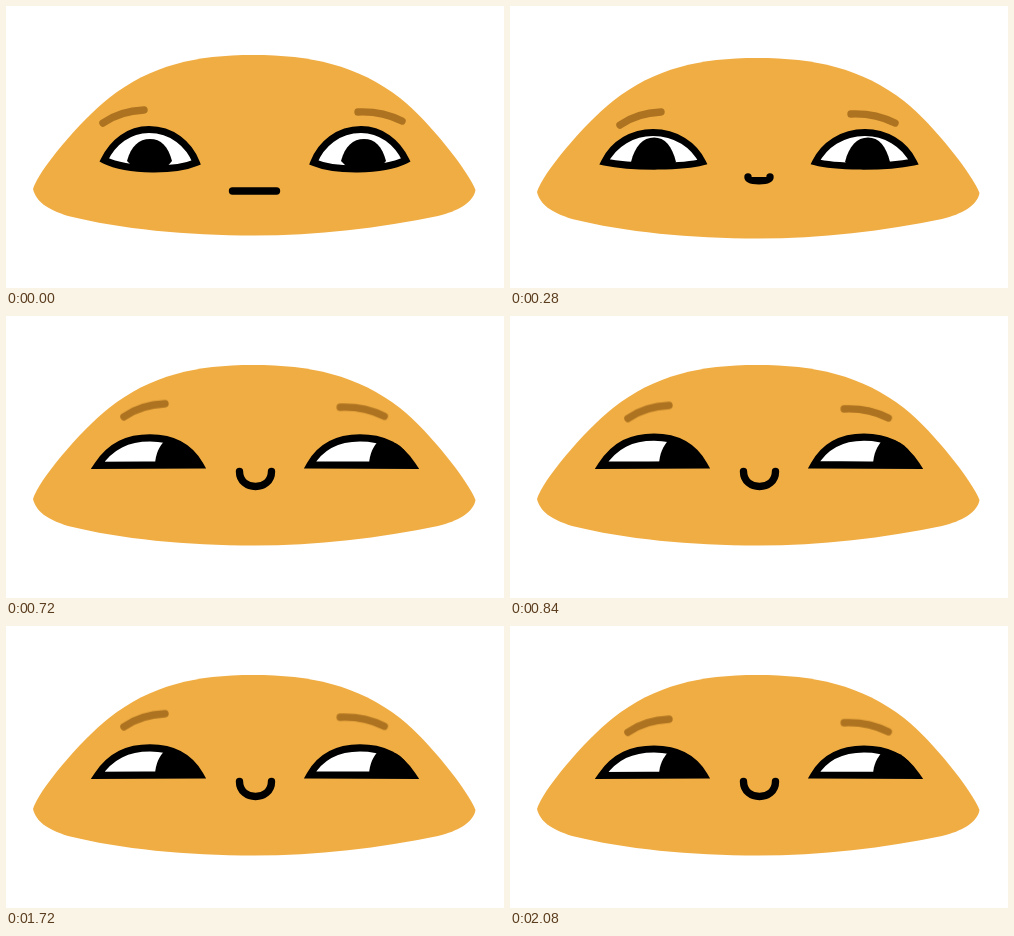
These frames come from a looping animation (498 px wide and 282 px high, 3 s). An HTML page without scripts:

```html
<!DOCTYPE html>
<html lang="en">
<head>
<meta charset="utf-8">
<title>Smirking face</title>
<style>
  html, body { margin: 0; width: 100%; height: 100%; overflow: hidden; background: #fff; }
  svg { display: block; width: 498px; height: 282px; animation: waggle 3s step-end infinite; }

  .body { fill: #f0ad43; }
  .eye { fill: #fff; stroke: #000; stroke-width: 7; }
  .brow, .mouth { fill: none; stroke-width: 7.4; stroke-linecap: round; }
  .brow { stroke: #ad7321; }
  .mouth { stroke: #000; }

  .face { animation: bob 3s infinite; }
  .eye { animation: eye 3s infinite; }
  .pupil { animation: pupil 3s infinite; }
  .mouth { animation: mouth 3s infinite; }
  .brow { animation: brow 3s infinite; }

  .brows { transform: translateY(var(--brow)); }
  .eyes { transform: scaleY(var(--lid)); transform-origin: 0 152px; }
  .left { --mid: 13px, -1px; --end: 21px, -10.8px; }
  .right { --mid: -11px, -1px; --end: -17.8px, -9.3px; }

  /* Pose changes run in 40 ms ticks: three to the half-way pose, four to the smirk. */
  @keyframes bob {
    0%, 5.333% { transform: translateY(0); animation-timing-function: steps(4); }
    10.666% { transform: translateY(4px); animation-timing-function: steps(3); }
    14.666%, 100% { transform: translateY(0); }
  }
  @keyframes eye {
    0%, 5.333% {
      d: path("M98.2 154C107 136 123 123.5 143 123.5C166 123.5 183 138 190.3 156.5C170 165 123 166 98.2 154Z");
      animation-timing-function: steps(3);
    }
    9.333% {
      d: path("M94.5 153C104 134 123 123.5 143 123.5C166 123.5 184 136 192.4 153C175 158 123 159 94.5 153Z");
      animation-timing-function: steps(4);
    }
    14.666%, 100% {
      d: path("M91.5 149.4C105 130 122 123 144 123C168 123 184 132 194 149C170 149.2 120 149.4 91.5 149.4Z");
    }
  }
  @keyframes pupil {
    0%, 5.333% {
      d: path("M121 155C125 140 133 133 144 133C155 133 162 140 166 155L160 162L128 162Z");
      animation-timing-function: steps(3);
    }
    9.333% {
      d: path("M121 153C125 137 133 128.5 144 128.5C155 128.5 162 137 166 153L162 157L126 157Z");
      animation-timing-function: steps(4);
    }
    14.666%, 100% {
      d: path("M149 149C149.5 138 153 132 159 125C175 124 186 132 192 148L190 149L149 149Z");
    }
  }
  @keyframes mouth {
    0%, 5.333% {
      d: path("M226.5 185C240 185 257 185 270.5 185");
      animation-timing-function: steps(3);
    }
    9.333% {
      d: path("M238 168C238 173 260 173 260 168");
      animation-timing-function: steps(4);
    }
    14.666%, 100% { d: path("M233.5 155.5C233.5 175.5 265.5 175.5 265.5 155.5"); }
  }
  @keyframes brow {
    0%, 5.333% { transform: translate(0px, 0px); animation-timing-function: steps(3); }
    9.333% { transform: translate(var(--mid)); animation-timing-function: steps(4); }
    14.666%, 100% { transform: translate(var(--end)); }
  }

  /* Two quick raises, played twice per loop; the lids trail the brows. */
  @keyframes waggle {
    0%, 29.333%, 36%, 62.666%, 69.333%, 100% { --brow: 0px; --lid: 1; }
    24%, 30.666%, 57.333%, 64% { --brow: -5.5px; --lid: 1.035; }
    25.333%, 32%, 58.666%, 65.333% { --brow: -10px; --lid: 1.08; }
    26.666%, 33.333%, 60%, 66.666% { --brow: -8px; --lid: 1.09; }
    28%, 34.666%, 61.333%, 68% { --brow: -3.8px; --lid: 1.065; }
  }
</style>
</head>
<body>
<svg viewBox="0 0 498 282">
  <g class="face">
    <path class="body" d="M27 183C32 165 73 116 103 92C145 59 190 49 247 49C305 49 351 59 394 92C424 116 462 165 469.5 184C467 197 452 205 432 210C375 222 310 229.5 248 229.5C180 229.5 115 223 62 210C40 203 30 195 27 183Z"/>
    <g class="brows">
      <path class="brow left" d="M97 117Q114 105 138 104"/>
      <path class="brow right" d="M352 106Q376 105 396 115"/>
    </g>
    <g class="eyes">
      <path class="eye"/>
      <path class="pupil"/>
      <g transform="translate(498) scale(-1 1)"><path class="eye"/></g>
      <g transform="translate(214)"><path class="pupil"/></g>
    </g>
    <path class="mouth"/>
  </g>
</svg>
</body>
</html>
```
